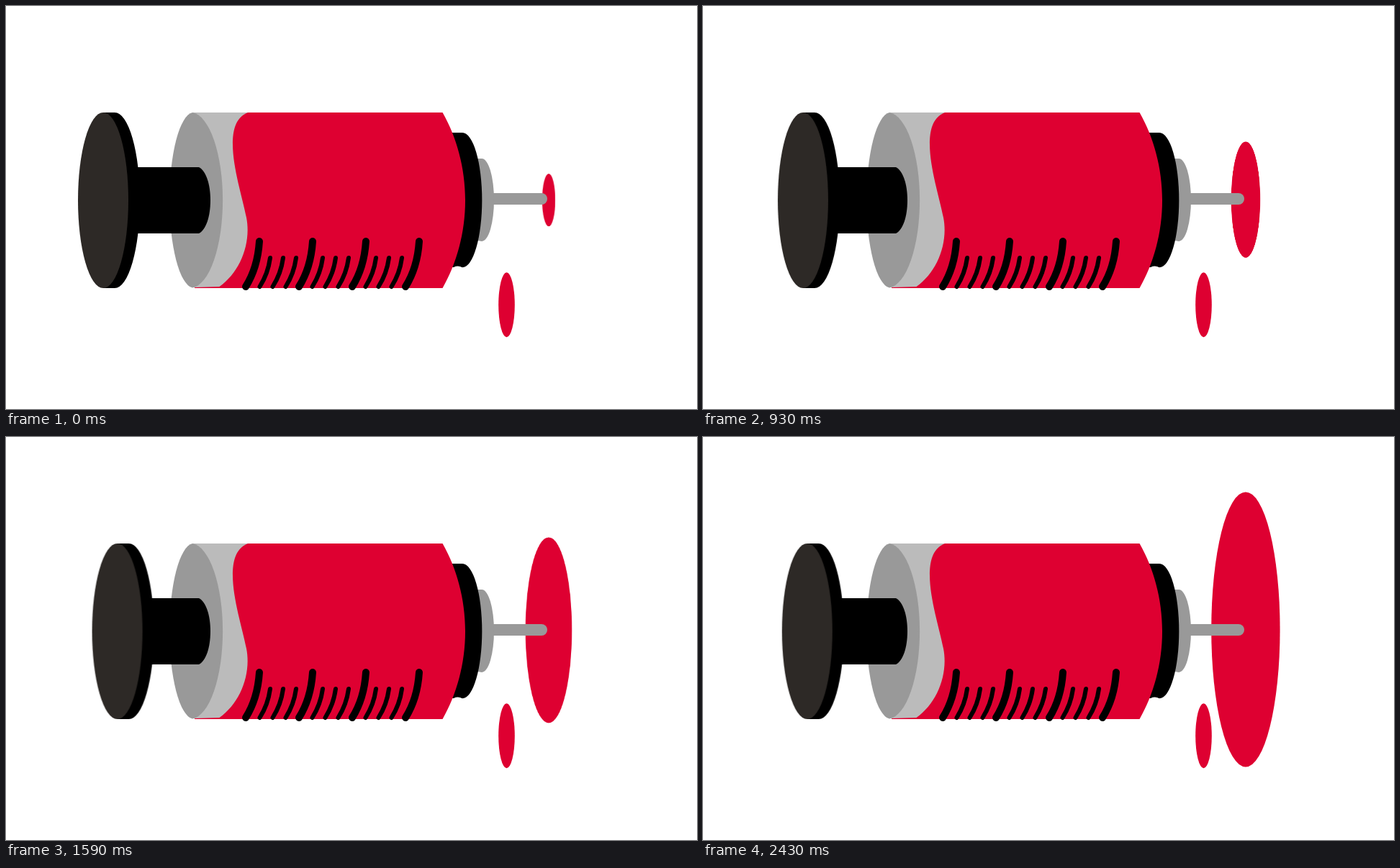
Write an HTML page that moves like this. It is 960 by 560 pixels and loops after 2460 ms.

```html
<!DOCTYPE html>
<html lang="en">
<head>
<meta charset="utf-8">
<title>Syringe</title>
<style>
  html, body { margin: 0; width: 100%; height: 100%; overflow: hidden; background: #fff; }
  svg { display: block; width: 960px; height: 560px; }

  .red { fill: #de0031; }
  .gray { fill: #999; }
  .light { fill: #bbb; }
  .dark { fill: #2d2926; }
  .needle { stroke: #999; stroke-width: 16; stroke-linecap: round; }
  .ticks { fill: none; stroke: #000; stroke-linecap: round; }

  .plunger, .drop { animation: 2460ms cubic-bezier(.333, 0, .667, 1) infinite; }
  .plunger { animation-name: push; }
  .drop { animation-name: grow; transform-origin: 754px 270.2px; }

  @keyframes push {
    0%, 33.41%, 68.33% { transform: translateX(0); }
    23.17%, 59.67% { transform: translateX(51px); }
    /* the last stroke is cut short by the loop */
    91.14% { transform: translateX(51px); animation-timing-function: cubic-bezier(.333, 0, .667, .749); }
    100% { transform: translateX(3.9px); }
  }
  @keyframes grow {
    0% { transform: scale(.1916); }
    23.17%, 33.54% { transform: scale(.4058); }
    61.99%, 65.93% { transform: scale(.6754); }
    97.6%, 100% { transform: scale(1); }
  }
</style>
</head>
<body>
<svg viewBox="0 0 960 560">
  <defs>
    <path id="long" d="M352 327C350.500 350 345 371 333 390" stroke-width="10"/>
    <path id="short" d="M367 350Q364 372 352.500 390" stroke-width="6"/>
    <g id="trio">
      <use href="#short"/>
      <use href="#short" x="18"/>
      <use href="#short" x="36"/>
    </g>
  </defs>

  <!-- tip -->
  <ellipse class="drop red" cx="753.900" cy="267.400" rx="47.700" ry="191"/>
  <ellipse class="red" cx="695.500" cy="415.300" rx="11.300" ry="45"/>
  <path class="needle" d="M660 268H744"/>
  <path class="gray" d="M645 212H661A17 57.500 0 0 1 661 327L645 324Z"/>
  <path d="M606 176H634A27.300 93.500 0 0 1 634 363.300Q628 360 622 363H606Z"/>

  <!-- barrel -->
  <path class="light" d="M259 148H345V391H259Z"/>
  <path class="red" d="M336 148H606.500C626 182 638 225 638 270S626 358 606.500 392H262V391L296.500 390C325 370 341 330 334 294C329 268 315 225 315 192C315 175 318 155 336 148Z"/>
  <path class="gray" d="M259 148A45 122 0 0 1 259 391.500A34 122 0 0 1 259 148Z"/>
  <g class="ticks">
    <use href="#long"/>
    <use href="#long" x="74"/>
    <use href="#long" x="148"/>
    <use href="#long" x="222"/>
    <use href="#trio"/>
    <use href="#trio" x="73"/>
    <use href="#trio" x="147"/>
  </g>

  <!-- plunger -->
  <path d="M200 224H268C278 229 284 248 284 270S278 311 268 316H200Z"/>
  <g class="plunger">
    <path d="M135 148H151A35 122 0 0 1 151 392H135ZM150 224H205V316H150Z"/>
    <ellipse class="dark" cx="135" cy="270" rx="35" ry="122"/>
  </g>
</svg>
</body>
</html>
```
